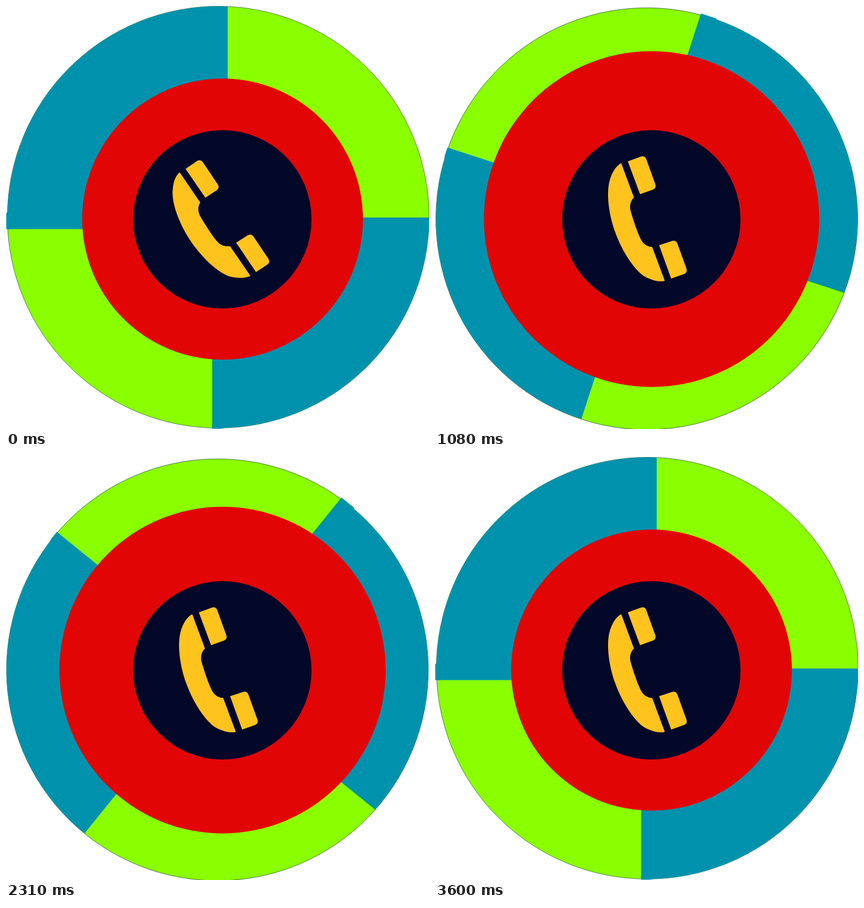
An HTML page that plays this animation: 748x748 px, repeating every 3630 ms.

```html
<!DOCTYPE html>
<html lang="en">
<head>
<meta charset="utf-8">
<title>Ringing phone</title>
<style>
  html, body { margin: 0; width: 100%; height: 100%; overflow: hidden; background: #fff; }
  svg { display: block; width: 100vw; height: 100vh; }
</style>
</head>
<body>
<svg viewBox="0 0 748 748">
  <defs>
    <clipPath id="rim"><circle cx="375.3" cy="373.4" r="372.9"/></clipPath>
  </defs>
  <g id="wheel">
    <circle cx="375.3" cy="373.4" r="372.9" fill="#8aff00" stroke="#234a2a" stroke-width=".7"/>
    <g fill="#0092ad">
      <g clip-path="url(#rim)">
        <path d="M0 0H392V374H748V748H364.5V394.5H0Z"/>
      </g>
      <path d="M.5 366L3.5 364H8V394.5H.5ZM364.5 740H386V746.5L380 747.6H364.5Z"/>
    </g>
  </g>
  <ellipse id="ring" cx="382.9" cy="376.8" fill="#e20505"/>
  <circle cx="382.5" cy="377.2" r="157.8" fill="#030728"/>
  <g id="phone" fill="#ffc31e">
    <path d="M307 294L343.5 347.5C339 354 339 363 343 371C351 385 365 407 374 417C380 424 388 425.500 396 424.500L432 477C424 482 408 482 393 477.500C368 467 341.500 438 326 414.700C310 391 294.500 356 294.500 330C295 313 299 301 307 294Z"/>
    <path d="M317.500 288L338 274Q344 270.500 348 276L374.500 315.500Q378 321 373 325.500L352.500 339Z"/>
    <path d="M407 418.500L427.500 405.500Q433.500 402 437.500 407.500L464 447Q467.500 453 462.500 457L442 470.500Z"/>
  </g>
</svg>
<script>
  const STEP = 30, FRAMES = 121, CYCLE = 54;
  const $ = id => document.getElementById(id);
  const wheel = $('wheel'), ring = $('ring'), phone = $('phone');

  // [step, value] keys with straight lines between them
  const ringKeys = [[0, 0], [18, 0], [24, 1], [30, 0], [36, 1], [42, 0], [54, 0]];
  const phoneKeys = [[0, 0], [6, 1], [24, 1], [30, 0], [36, 1], [42, 0], [54, 0]];

  function tween(keys, x) {
    const i = keys.findIndex(k => k[0] > x);
    const [x0, y0] = keys[i - 1], [x1, y1] = keys[i];
    return y0 + (y1 - y0) * (x - x0) / (x1 - x0);
  }

  function draw(ms) {
    const n = Math.floor(ms / STEP) % FRAMES;
    const beat = n % CYCLE;
    const turn = 3 * (60 - Math.abs(60 - n));
    const r = 248.6 + 48.3 * tween(ringKeys, beat);
    wheel.setAttribute('transform', `rotate(${turn} 373.9 374.5)`);
    ring.setAttribute('rx', r * 0.9985);
    ring.setAttribute('ry', r);
    phone.setAttribute('transform', `rotate(${14 * tween(phoneKeys, beat)} 383 377)`);
  }

  const start = performance.now();
  function tick() {
    draw(performance.now() - start);
    requestAnimationFrame(tick);
  }
  draw(0);
  requestAnimationFrame(tick);
</script>
</body>
</html>
```
